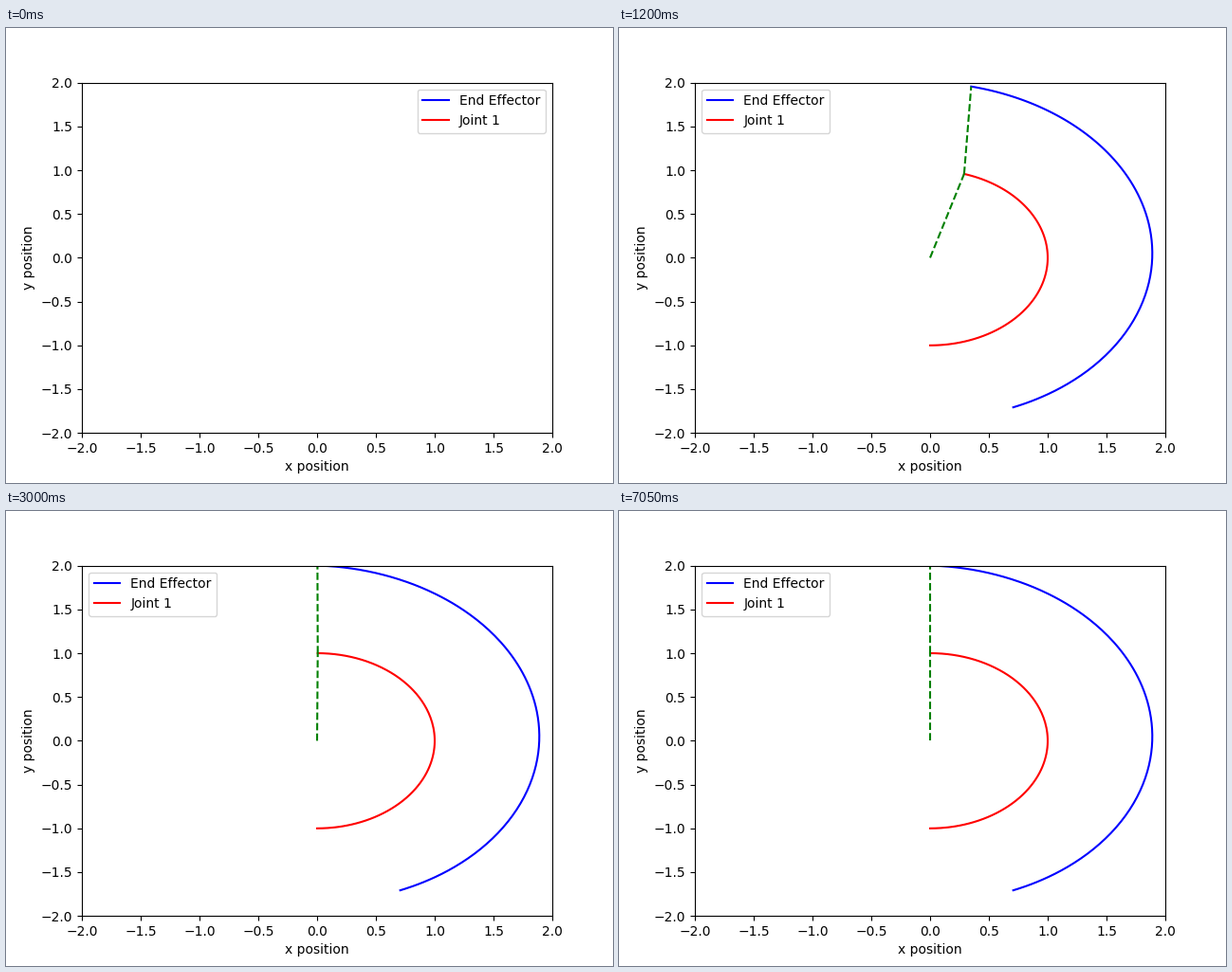
Write a matplotlib script that moves like this. It is 640x480 px and loops after 10 s.

```python
import numpy as np
import matplotlib.pyplot as plt
from matplotlib.animation import FuncAnimation

FRAMES = 200
INTERVAL = 50           # ms
SUBSTEPS = 5            # trail samples per frame
DT = INTERVAL / 1000 / SUBSTEPS

SLOW, FAST = 2.2, 9.3   # overdamped shoulder rates
DECAY, OMEGA = 1.87, 0.6  # lightly underdamped elbow


def shoulder_angle(t):
    """Swings from straight down to straight up."""
    error = (FAST * np.exp(-SLOW * t) - SLOW * np.exp(-FAST * t)) / (FAST - SLOW)
    return np.pi / 2 - np.pi * error


def elbow_angle(t):
    """Straightens from 45 degrees to zero."""
    wave = np.cos(OMEGA * t) + DECAY / OMEGA * np.sin(OMEGA * t)
    return np.pi / 4 * np.exp(-DECAY * t) * wave


t = np.arange(FRAMES * SUBSTEPS + 1) * DT
q1 = shoulder_angle(t)
q2 = elbow_angle(t)
x1, y1 = np.cos(q1), np.sin(q1)
x2, y2 = x1 + np.cos(q1 + q2), y1 + np.sin(q1 + q2)

fig, ax = plt.subplots(figsize=(6.4, 4.8), dpi=100)
ax.set_xlim(-2, 2)
ax.set_ylim(-2, 2)
ax.set_xlabel("x position")
ax.set_ylabel("y position")

effector_trail, = ax.plot([], [], "b", label="End Effector")
joint_trail, = ax.plot([], [], "r", label="Joint 1")
upper_link, = ax.plot([], [], "g--")
lower_link, = ax.plot([], [], "g--")
ax.legend(loc="best")   # moves aside when the trail reaches it

artists = (effector_trail, joint_trail, upper_link, lower_link)


def reset():
    for line in artists:
        line.set_data([], [])
    return artists


def update(frame):
    if frame == 0:
        return reset()
    k = frame * SUBSTEPS
    effector_trail.set_data(x2[:k + 1], y2[:k + 1])
    joint_trail.set_data(x1[:k + 1], y1[:k + 1])
    upper_link.set_data([0, x1[k]], [0, y1[k]])
    lower_link.set_data([x1[k], x2[k]], [y1[k], y2[k]])
    return artists


anim = FuncAnimation(fig, update, frames=FRAMES, init_func=reset,
                     interval=INTERVAL, repeat=True, repeat_delay=0, blit=False)
plt.show()
```
